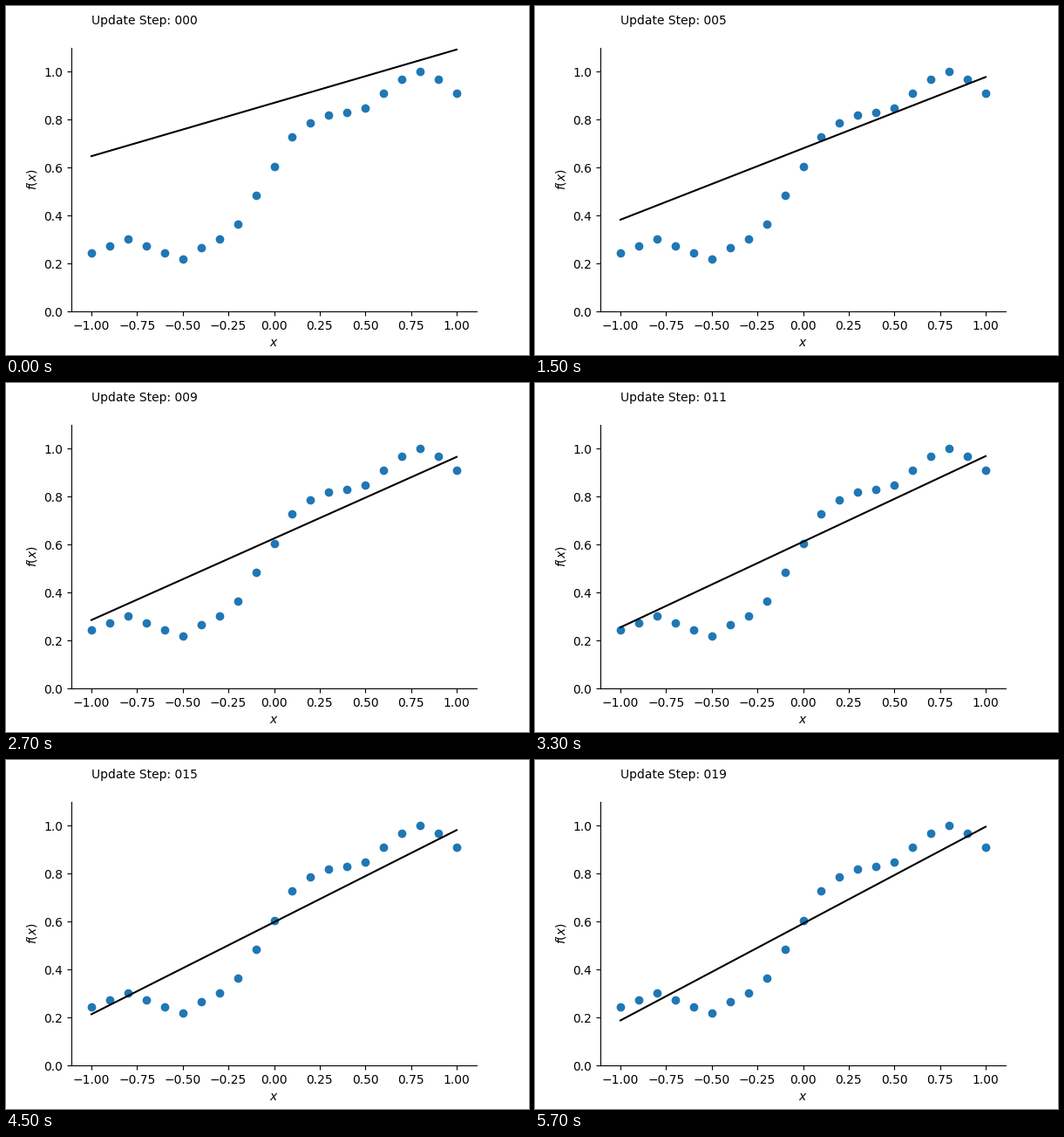
A matplotlib script that plays this animation: 600x400 px, repeating every 6000 ms.

```python
import numpy as np
import matplotlib.pyplot as plt
from matplotlib.animation import FuncAnimation

STEPS = 20
RATE = 0.1

x = np.linspace(-1, 1, 21)
y = np.array([8, 9, 10, 9, 8, 7.2, 8.8, 10, 12, 16, 20,
              24, 26, 27, 27.4, 28, 30, 32, 33, 32, 30]) / 33


def descend(slope, bias):
    """Gradient descent on the mean squared error of a straight line."""
    path = []
    for _ in range(STEPS):
        path.append((slope, bias))
        err = slope * x + bias - y
        slope -= 2 * RATE * np.mean(err * x)
        bias -= 2 * RATE * np.mean(err)
    return path


path = descend(0.2225, 0.8705)

fig, ax = plt.subplots(figsize=(6, 4), dpi=100)
fig.subplots_adjust(left=0.125, right=0.9, bottom=0.125, top=0.88)
ax.scatter(x, y)
line, = ax.plot([], [], color="black", lw=1.5)
label = ax.text(-1, 1.2, "")
ax.set(xlim=(-1.11, 1.11), ylim=(0, 1.1), xlabel="$x$", ylabel="$f(x)$")
ax.spines[["top", "right"]].set_visible(False)


def update(step):
    slope, bias = path[step]
    line.set_data(x, slope * x + bias)
    label.set_text(f"Update Step: {step:03d}")
    return line, label


anim = FuncAnimation(fig, update, frames=STEPS, interval=300,
                     repeat=True, repeat_delay=0)
plt.show()
```
